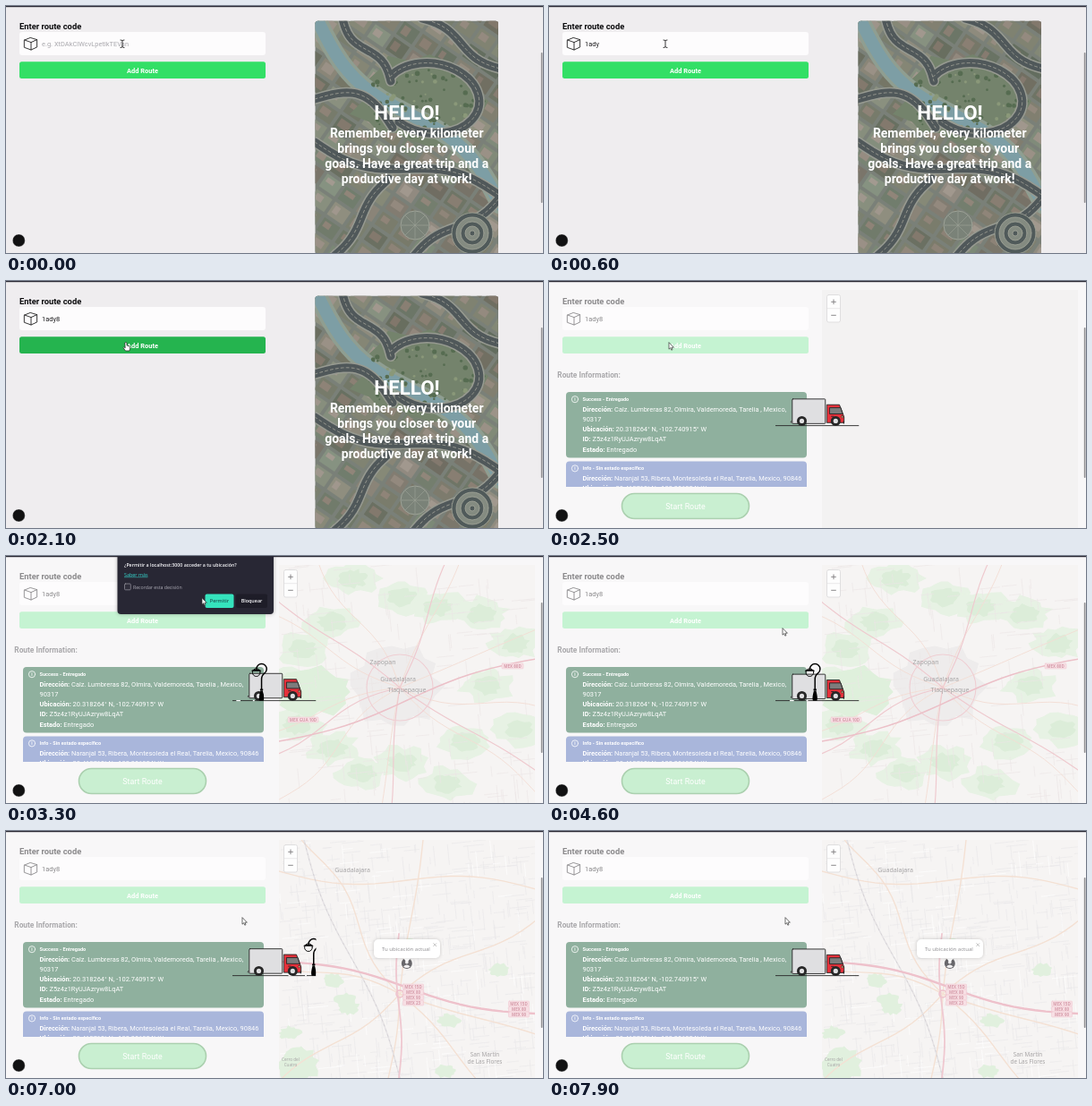
Write an HTML page with a canvas that moves like this. It is 600 px wide and 276 px high and loops after 8 s.

```html
<!DOCTYPE html>
<html lang="en">
<head>
<meta charset="utf-8">
<title>Route loader</title>
<style>
html, body { margin: 0; width: 100%; height: 100%; overflow: hidden; background: #efedef; }
canvas { display: block; width: 600px; height: 276px; }
</style>
</head>
<body>
<canvas id="stage"></canvas>
<script>
const W = 600, H = 276, LOOP = 8000, TAU = Math.PI * 2;
const dpr = window.devicePixelRatio || 1;
const LOAD = 2220, ROUTE = 2420, ASK = 2600, ALLOWED = 3760, LOCATED = 6620;
const ROBOTO = 'Roboto, "Liberation Sans", sans-serif';
const OPEN = '"Open Sans", "Noto Sans", sans-serif';
const NOTO = '"Noto Sans", "Open Sans", sans-serif';

const clamp = v => Math.max(0, Math.min(1, v));
const smooth = v => { v = clamp(v); return v * v * (3 - 2 * v); };

function setup(cv) {
  cv.width = W * dpr;
  cv.height = H * dpr;
  const c = cv.getContext('2d');
  c.scale(dpr, dpr);
  c.lineJoin = c.lineCap = 'round';
  return c;
}

function layer(paint) {
  const cv = document.createElement('canvas');
  paint(setup(cv));
  return cv;
}

function seeded(s) {
  return () => (s = (s * 16807) % 2147483647) / 2147483647;
}

function box(c, x, y, w, h, r, fill, line, lw = 1) {
  c.beginPath();
  c.roundRect(x, y, w, h, r);
  if (fill) { c.fillStyle = fill; c.fill(); }
  if (line) { c.strokeStyle = line; c.lineWidth = lw; c.stroke(); }
}

function disc(c, x, y, r, fill, line, lw = 1) {
  c.beginPath();
  c.arc(x, y, r, 0, TAU);
  if (fill) { c.fillStyle = fill; c.fill(); }
  if (line) { c.strokeStyle = line; c.lineWidth = lw; c.stroke(); }
}

function text(c, s, x, y, font, color, align = 'left') {
  c.font = font;
  c.fillStyle = color;
  c.textAlign = align;
  c.fillText(s, x, y);
  return c.measureText(s).width;
}

function shape(c, d, fill, line, lw = 1) {
  const p = new Path2D(d);
  if (fill) { c.fillStyle = fill; c.fill(p); }
  if (line) { c.strokeStyle = line; c.lineWidth = lw; c.stroke(p); }
}

// Path from a to b that sways sideways by amp over a number of turns
function wave(x0, y0, x1, y1, amp = 0, turns = 1) {
  const p = new Path2D(), dx = x1 - x0, dy = y1 - y0, len = Math.hypot(dx, dy);
  for (let i = 0; i <= 24; i++) {
    const k = i / 24, s = amp * Math.sin(k * turns * TAU) / len;
    p.lineTo(x0 + dx * k - dy * s, y0 + dy * k + dx * s);
  }
  return p;
}

function stroke(c, path, color, lw, dash = []) {
  c.strokeStyle = color;
  c.lineWidth = lw;
  c.setLineDash(dash);
  c.stroke(path);
  c.setLineDash([]);
}

function blob(c, x, y, rx, ry, rnd, color) {
  c.beginPath();
  for (let i = 0; i < 22; i++) {
    const a = i / 22 * TAU, k = 0.7 + rnd() * 0.4;
    c.lineTo(x + Math.cos(a) * rx * k, y + Math.sin(a) * ry * k);
  }
  c.fillStyle = color;
  c.fill();
}

// ---- picture on the first page
const city = layer(c => {
  const rnd = seeded(77);
  c.beginPath();
  c.roundRect(345.5, 16.8, 204.5, 270, 3);
  c.clip();
  c.fillStyle = '#7a8078';
  c.fillRect(345, 16, 206, 260);

  c.save();
  c.translate(448, 146);
  c.rotate(0.6);
  for (let i = -7; i < 7; i++) for (let j = -8; j < 8; j++) {
    const light = 40 + rnd() * 14;
    c.fillStyle = `hsl(${35 + rnd() * 70}, 7%, ${light}%)`;
    c.fillRect(i * 25, j * 21, 21, 17);
    c.fillStyle = `hsl(32, 9%, ${light + 6}%)`;
    c.fillRect(i * 25 + 3, j * 21 + 3, 6 + rnd() * 8, 5 + rnd() * 6);
  }
  c.restore();

  blob(c, 462, 106, 80, 52, rnd, '#74836c');
  const river = wave(350, 20, 552, 222, 15);
  stroke(c, river, '#8f9e91', 21);
  stroke(c, river, '#7d9ea5', 14);
  for (let i = 0; i < 110; i++) {
    const a = rnd() * TAU, r = Math.sqrt(rnd());
    disc(c, 466 + Math.cos(a) * r * 68, 106 + Math.sin(a) * r * 42, 1 + rnd() * 1.8, rnd() < 0.6 ? '#566c51' : '#8a9879');
  }
  const loop = new Path2D();
  loop.ellipse(475, 103, 54, 39, 0.15, -2.7, 2.2);
  const roads = [
    loop,
    wave(345, 104, 432, 136, -22, 0.5),
    wave(376, 14, 430, 84, 6),
    wave(345, 152, 552, 212, 11),
    wave(366, 280, 428, 193, 4),
    wave(465, 14, 552, 70, -5),
    wave(455, 280, 552, 214, -5)
  ];
  roads.forEach(p => stroke(c, p, '#979a91', 12));
  roads.forEach(p => stroke(c, p, '#50585a', 9));
  roads.forEach(p => stroke(c, p, '#b0afa3', 0.7, [3, 3]));

  disc(c, 457, 245, 16, '#7a8278', '#9da297');
  for (let a = 0; a < Math.PI; a += Math.PI / 4) {
    const x = Math.cos(a) * 15, y = Math.sin(a) * 15;
    stroke(c, wave(457 - x, 245 - y, 457 + x, 245 + y), '#9da297', 0.7);
  }
  for (let i = 0; i < 5; i++) disc(c, 521, 254, 23 - i * 5, i % 2 ? '#848b81' : '#505a5a', '#a5a79b', 0.8);
});

// ---- street maps
function mapBase(c) {
  c.beginPath();
  c.rect(305, 10, 286, 266);
  c.clip();
  c.fillStyle = '#f6f4f3';
  c.fillRect(305, 10, 286, 266);
}

function shields(c, x, y, w, names) {
  names.forEach((s, i) => {
    box(c, x - w / 2, y + i * 6 - 3, w, 6, 1, '#f7dfe4', '#efc5ce', 0.5);
    text(c, s, x, y + i * 6 + 1.7, '700 4.5px ' + NOTO, '#d59aa8', 'center');
  });
}

function place(c, s, x, y, size = 7) {
  text(c, s, x, y, size + 'px ' + NOTO, '#a6a4a5', 'center');
}

function lanes(c, rnd, n, size, color) {
  for (let i = 0; i < n; i++) {
    const x = 305 + rnd() * 286, y = 10 + rnd() * 266, l = size * (0.4 + rnd());
    const a = i % 2 * Math.PI / 2 - 0.1;
    stroke(c, wave(x, y, x + Math.cos(a) * l, y + Math.sin(a) * l), color, 0.7);
  }
}

// Roads leaving one hub in all directions
function spokes(c, rnd, x, y, n, color, lw) {
  for (let i = 0; i < n; i++) {
    const a = (i + rnd() * 0.5) / n * TAU;
    stroke(c, wave(x, y, x + Math.cos(a) * 290, y + Math.sin(a) * 260, 16 * (rnd() - 0.5), 1.5), color, lw);
  }
}

const wideMap = layer(c => {
  const rnd = seeded(412);
  mapBase(c);
  for (let i = 0; i < 16; i++) {
    const a = i / 16 * TAU, r = 95 + rnd() * 50;
    const x = 442 + Math.cos(a) * r, y = 145 + Math.sin(a) * r * 0.9;
    blob(c, x, y, 32, 20, rnd, '#e7f2e4');
    blob(c, x, y, 17, 11, rnd, '#dcedd9');
  }
  blob(c, 345, 152, 48, 28, rnd, '#dff0dc');
  blob(c, 438, 145, 52, 48, rnd, '#eeecec');
  lanes(c, rnd, 190, 20, '#ebe6e6');
  spokes(c, rnd, 440, 147, 9, '#f3ddd4', 0.9);
  spokes(c, rnd, 440, 147, 5, '#efcacf', 1.2);
  disc(c, 440, 147, 37, null, '#efced3', 1.1);
  stroke(c, wave(305, 207, 592, 115, 6), '#ecc0c8', 1.5);
  shields(c, 332, 183, 34, ['MEX GUA 10D']);
  shields(c, 566, 123, 24, ['MEX 80D']);
  place(c, 'Zapopan', 421, 121);
  place(c, 'Guadalajara', 438, 140);
  place(c, 'Tlaquepaque', 448, 152);
});

const nearMap = layer(c => {
  const rnd = seeded(905);
  mapBase(c);
  lanes(c, rnd, 520, 17, '#e9e7e8');
  lanes(c, rnd, 110, 20, '#fff');
  for (let i = 0; i < 9; i++) blob(c, 305 + rnd() * 286, 10 + rnd() * 266, 13, 8, rnd, '#e1f0de');
  blob(c, 326, 262, 26, 22, rnd, '#e1f0de');
  spokes(c, rnd, 440, 182, 8, '#f4e1d4', 1.4);
  stroke(c, wave(305, 45, 592, 65, 9), '#f4e1d4', 1.4);
  const rail = wave(333, 10, 440, 276, 6);
  stroke(c, rail, '#d5d2d6', 1.2);
  stroke(c, rail, '#f8f6f7', 0.5, [3, 3]);
  stroke(c, wave(305, 146, 592, 204, -7), '#eec1cb', 2.4);
  stroke(c, wave(439, 115, 439, 276, 3), '#efc8d0', 1.8);
  disc(c, 440, 182, 4, null, '#eec1cb', 1.5);
  shields(c, 455, 174, 23, ['MEX 15D', 'MEX 80', 'MEX 90', 'MEX 23']);
  shields(c, 573, 193, 23, ['MEX 15D', 'MEX 80', 'MEX 90']);
  place(c, 'Guadalajara', 387, 46);
  place(c, 'San Martín', 535, 252, 6.4);
  place(c, 'de Las Flores', 535, 260, 6.4);
  place(c, 'Cerro del', 318, 257, 4.6);
  place(c, 'Cuatro', 318, 263, 4.6);
});

// ---- form parts
function form(c, o) {
  text(c, 'Enter route code', 15, 26, '700 9.35px ' + ROBOTO, o.title);
  box(c, 15, 29, 275, 26, 3, o.field);
  shape(c, 'M20.7 38L27.2 35.4L34.6 37.6V46L28 49L20.7 46.4ZM20.7 38L28 40.6L34.6 37.6M28 40.6V49', null, o.icon, 0.9);
  text(c, o.value || 'e.g. XtDAkCIWcvLpetIkTEVan', 40, 44.8, '7.44px ' + ROBOTO, o.value ? o.ink : '#a9a8ad');
  box(c, 15, 62.3, 275, 18.7, 2.5, o.button);
  text(c, 'Add Route', 152.5, 74.5, '700 7.44px ' + ROBOTO, '#fff', 'center');
}

function field(c, label, value, y) {
  const w = text(c, label + ' ', 37.5, y, '700 7.44px ' + ROBOTO, '#fff');
  text(c, value, 37.5 + w, y, '7.44px ' + ROBOTO, '#fff');
}

function cardHead(c, s, y) {
  disc(c, 29, y - 1.8, 3.6, null, '#fff', 0.8);
  text(c, 'i', 29, y, '700 5.2px ' + ROBOTO, '#fff', 'center');
  text(c, s, 37.5, y, '700 5.58px ' + ROBOTO, '#fff');
}

const routePage = layer(c => {
  c.fillStyle = '#f8f7f8';
  c.fillRect(0, 0, W, H);
  form(c, { title: '#8b8a8c', field: '#fdfcfd', icon: '#8d8c8e', value: '1ady8', ink: '#8b8a8c', button: '#c5f3d2' });
  text(c, 'Route Information:', 9.3, 108, '700 8.37px ' + ROBOTO, '#a9a8ab');

  box(c, 19, 124, 269, 73.5, 4, '#8fb09e');
  cardHead(c, 'Success - Entregado', 134);
  field(c, 'Dirección:', 'Calz. Lumbreras 82, Olmira, Valdemoreda, Tarelia , Mexico,', 145.8);
  text(c, '90317', 37.5, 157, '7.44px ' + ROBOTO, '#fff');
  field(c, 'Ubicación:', '20.318264° N, -102.740915° W', 168.2);
  field(c, 'ID:', 'Z5z4z1RyUJAzryw8LqAT', 179.4);
  field(c, 'Estado:', 'Entregado', 190.6);

  c.save();
  c.beginPath();
  c.rect(0, 198, 300, 32);
  c.clip();
  box(c, 19, 201.5, 269, 60, 4, '#a9b6db');
  cardHead(c, 'Info - Sin estado específico', 211.2);
  field(c, 'Dirección:', 'Naranjal 53, Ribera, Montesoleda el Real, Tarelia, Mexico, 90846', 222.5);
  field(c, 'Ubicación:', '20.462718° N, -102.386054° W', 233.7);
  c.restore();

  box(c, 81.5, 237.5, 142, 28, 14, '#c9efd1', '#abd0af', 1.6);
  text(c, 'Start Route', 152.5, 254.8, '8.9px ' + ROBOTO, '#fff', 'center');
  c.fillStyle = '#f3f2f2';
  c.fillRect(305, 10, 286, 266);
});

function zoomButtons(c) {
  box(c, 310.5, 15.5, 15, 30.5, 2, '#fdfdfd', '#dddcdd', 0.9);
  shape(c, 'M311 30.7H325', null, '#dddcdd', 0.6);
  shape(c, 'M315.6 23.3H320.4M318 20.9V25.7M315.6 38.3H320.4', null, '#7d7c7e', 0.9);
}

function hereMarker(c) {
  disc(c, 447.8, 148, 6, '#69686c');
  disc(c, 447.8, 146.5, 1.9, '#f1f0f1');
  shape(c, 'M444 151.5Q447.8 147.5 451.6 151.5Q447.8 154.5 444 151.5Z', '#f1f0f1');
  c.save();
  c.shadowColor = 'rgba(0,0,0,.18)';
  c.shadowBlur = 4 * dpr;
  shape(c, 'M443 141H453L448 147Z', '#fff');
  box(c, 411, 121, 74, 21, 5, '#fff');
  c.restore();
  text(c, 'Tu ubicación actual', 420, 134, '6px ' + NOTO, '#929194');
  shape(c, 'M477.7 125.7l3 3m0-3l-3 3', null, '#aaa', 0.7);
}

function permission(c) {
  c.save();
  c.shadowColor = 'rgba(0,0,0,.3)';
  c.shadowBlur = 4 * dpr;
  box(c, 124.5, 0, 174.5, 65, [0, 0, 4, 4], '#282734');
  c.restore();
  text(c, '¿Permitir a localhost:3000 acceder a tu ubicación?', 132, 12, '600 5.25px ' + OPEN, '#fbfbfe');
  const w = text(c, 'Saber más', 132, 22.6, '5.4px ' + OPEN, '#35d9d0');
  c.fillRect(132, 23.6, w, 0.5);
  box(c, 132.5, 31, 6.8, 6.8, 1, '#2f2e3b', '#8d8c96', 0.8);
  text(c, 'Recordar esta decisión', 142, 36.7, '5.2px ' + OPEN, '#aeadb7');
  box(c, 222.5, 42.5, 32, 15.5, 2, '#35e3bd');
  text(c, 'Permitir', 238.5, 52.2, '600 5.4px ' + OPEN, '#1d5a58', 'center');
  box(c, 257, 42.5, 35, 15.5, 2, '#1e1d28');
  text(c, 'Bloquear', 274.5, 52.2, '600 5.4px ' + OPEN, '#fbfbfe', 'center');
}

// ---- delivery truck
function truck(c, t) {
  const ink = '#282828', p = t / 1400 % 1, b = t / 1000 % 1, shift = -163 * p;
  c.save();
  c.beginPath();
  c.rect(253, 110, 93.5, 54);
  c.clip();

  c.fillStyle = ink;
  c.fillRect(253, 161.2, 93.5, 0.9);
  c.fillStyle = '#fff';
  c.fillRect(383.2 + shift, 161, 4.65, 1.2);
  c.fillRect(401.7 + shift, 161, 1.9, 1.2);

  c.save();
  c.translate(269.8, 130.6 + 1.4 * (1 - Math.abs(2 * b - 1)));
  c.scale(0.3055, 0.3055);
  shape(c, 'M134 22.5H179L196 67V88H134Z', '#e5303a', ink, 3);
  shape(c, 'M144 33.5H184L191 56H144Z', '#7d7c7c', ink, 3);
  shape(c, 'M150 65H158', null, ink, 3);
  box(c, 187, 63, 5, 7, 1, '#fffcab', ink, 2);
  box(c, 193, 81, 4, 11, 1, ink);
  box(c, 6.5, 1.5, 121, 90, 2.5, '#dfdfe1', ink, 3);
  box(c, 1, 84, 6, 4, 2, '#dfdfe1', ink, 2);
  c.restore();

  for (const x of [282.5, 320.3]) {
    disc(c, x, 156.4, 5.5, ink);
    disc(c, x, 156.4, 2.6, '#dfdfe1');
  }

  // street lamp
  c.translate(388 + shift, 119.8);
  c.scale(0.0925, 0.0925);
  shape(c, 'M191 70A62 62 0 0 1 315 70C315 140 253 105 253 197V312', null, '#000', 16);
  disc(c, 190, 112, 47, null, '#000', 10);
  shape(c, 'M130 96C130 68 250 68 250 96ZM235 310H271V328H235ZM240 326C236 354 213 422 230 453H276C293 422 270 354 266 326Z', '#000');
  c.restore();
}

// ---- pointer: start and end of each move, and where it leads
const moves = [
  [740, 1080, 134, 69], [2650, 3200, 219, 47], [3360, 3600, 231, 50],
  [3880, 4450, 261, 81], [4700, 5200, 264, 97]
];

function pointerAt(t) {
  return moves.reduce(([x, y], [from, to, u, v]) => {
    const k = smooth((t - from) / (to - from));
    return [x + (u - x) * k, y + (v - y) * k];
  }, [130, 42]);
}

function pointer(c, x, y, kind) {
  c.save();
  c.translate(x, y);
  if (kind === 'beam') {
    shape(c, 'M-2-4Q0-4 0-3Q0-4 2-4M0-3V3.5M-2 4.5Q0 4.5 0 3.5Q0 4.5 2 4.5', null, '#222', 0.9);
  } else if (kind === 'hand') {
    shape(c, 'M-1 0Q0-1 1 0V3L4 4Q5 4.4 4.7 6L4 9H-.5L-3 5.6Q-2.6 4.2-1 5.5Z', '#fff', '#222', 0.7);
  } else {
    shape(c, 'M0 0V7.2L1.7 5.7L2.8 8.2L4 7.7L2.9 5.2H5Z', '#fff', '#333', 0.7);
  }
  c.restore();
}

// ---- scene
const ctx = setup(document.getElementById('stage'));

function put(cv, alpha = 1) {
  ctx.globalAlpha = clamp(alpha);
  ctx.drawImage(cv, 0, 0, W, H);
  ctx.globalAlpha = 1;
}

function startPage(t, hover) {
  ctx.fillStyle = '#efedef';
  ctx.fillRect(0, 0, W, H);
  const typed = Math.ceil(clamp((t - 250) / 450) * 5);
  form(ctx, {
    title: '#0c0c0e', field: '#fdfcfd', icon: '#222', ink: '#1c1c1e',
    value: '1ady8'.slice(0, typed), button: hover ? '#25b44f' : '#33df66'
  });
  put(city);
  text(ctx, 'HELLO!', 448, 126.6, '700 22.32px ' + ROBOTO, '#fff', 'center');
  ['Remember, every kilometer', 'brings you closer to your', 'goals. Have a great trip and a', 'productive day at work!']
    .forEach((s, i) => text(ctx, s, 447.7, 147.2 + i * 16.8, '700 13.95px ' + ROBOTO, '#fff', 'center'));
}

function draw(t) {
  const [x, y] = pointerAt(t);
  const loading = t >= LOAD, hover = y > 62 && !loading;
  if (t < ROUTE) {
    startPage(t, hover);
    if (loading) {
      ctx.fillStyle = 'rgba(255,255,255,.55)';
      ctx.fillRect(0, 0, W, H);
    }
  } else {
    put(routePage);
    put(wideMap, (t - ROUTE - 150) / 300);
    if (t >= LOCATED) {
      put(nearMap, (t - LOCATED) / 250);
      hereMarker(ctx);
    }
    zoomButtons(ctx);
  }
  if (loading) truck(ctx, t - LOAD);

  ctx.fillStyle = '#2b2a35';
  ctx.fillRect(0, 0, W, 1.2);
  box(ctx, 597.8, 52, 1.7, 168, 0.8, '#929194');
  disc(ctx, 14.3, 262, 7, '#121213', 'rgba(255,255,255,.6)', 0.6);

  if (t >= ASK && t < ALLOWED) permission(ctx);
  pointer(ctx, x, y, hover ? 'hand' : !loading && y < 55 ? 'beam' : 'arrow');
}

const began = performance.now();
function tick() {
  draw((performance.now() - began) % LOOP);
  requestAnimationFrame(tick);
}
tick();
</script>
</body>
</html>
```
